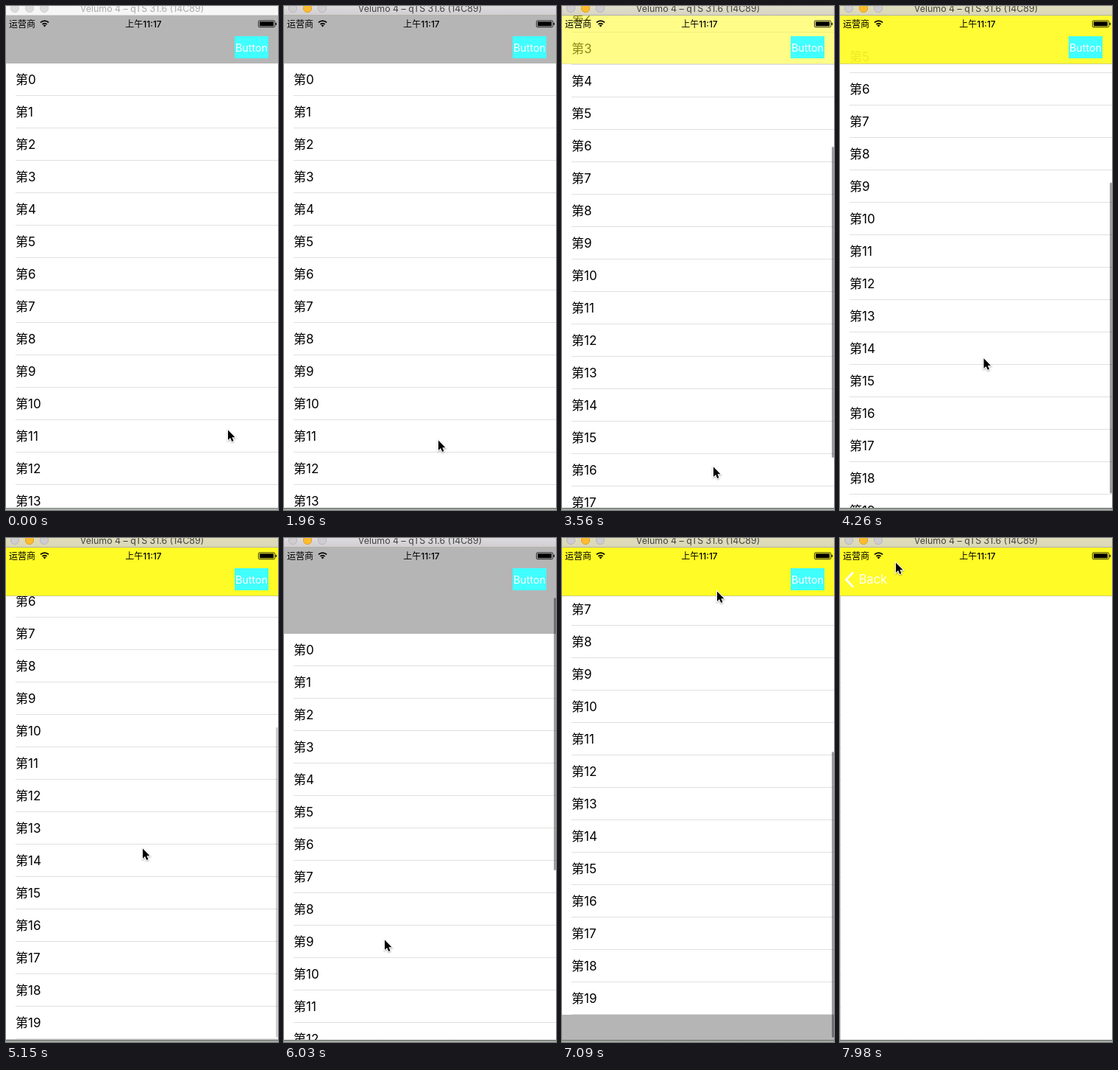
An HTML page with a canvas for the animation above (8 s loop, 370 by 684 pixels).

```html
<!DOCTYPE html>
<html lang="zh-CN">
<head>
<meta charset="utf-8">
<style>
  html, body { margin: 0; height: 100%; overflow: hidden; background: #fff; }
  canvas { display: block; }
</style>
</head>
<body>
<canvas id="stage" width="370" height="684"></canvas>
<script>
const ctx = document.getElementById('stage').getContext('2d');
const LOOP = 8000, STEP = 177.2;
const W = 370, TOP = 13, NAV = 78, BOTTOM = 681;
const ROW = 44, ROWS = 20, MAX_SCROLL = 277;
const FONT = 'Inter, "Noto Sans CJK SC", "Noto Sans CJK", sans-serif';

// Each track holds [step, value, ...] points
const SCROLL = [[11, 0], [12, 8], [15, 140], [17, 172], [20, 174], [25, 270], [27, 277],
  [30, 278], [32, 318], [33, 280], [34, -52], [36, 0], [37, 20], [39, 240], [40, 311], [42, 277]];
const CURSOR = [[1, 301, 574], [3, 207, 557], [5, 207, 557], [8, 209, 580], [11, 209, 588],
  [15, 208, 440], [17, 206, 440], [20, 205, 624], [25, 192, 440], [29, 185, 420],
  [32, 190, 55], [33, 172, 150], [34, 136, 544], [37, 160, 500], [40, 210, 71],
  [42, 328, 58], [43, 320, 56], [45, 75, 32]];
const PUSH = [[42, 0], [43, .4], [44, .9], [45, .997]];

function valueAt(track, step) {
  const next = track.findIndex(point => point[0] >= step);
  if (next <= 0) return track.at(next).slice(1);
  const a = track[next - 1], b = track[next];
  const part = (step - a[0]) / (b[0] - a[0]);
  return a.map((value, i) => value + (b[i] - value) * part).slice(1);
}

function barOpacity(step) {
  if (step < 12) return 0;
  if (step > 41) return Math.max(0, (44 - step) / 2);
  return step === 28 ? .75 : step === 29 ? .5 : 1;
}

function rect(color, x, y, w, h) {
  ctx.fillStyle = color;
  ctx.fillRect(x, y, w, h);
}

function text(string, x, y, size, color = '#000', align = 'left', weight = 400) {
  ctx.font = `${weight} ${size}px ${FONT}`;
  ctx.fillStyle = color;
  ctx.textAlign = align;
  ctx.fillText(string, x, y);
}

function gradient(y0, y1, from, to) {
  const fill = ctx.createLinearGradient(0, y0, 0, y1);
  fill.addColorStop(0, from);
  fill.addColorStop(1, to);
  return fill;
}

function drawList(scroll, opacity) {
  const top = NAV - scroll;
  rect('#b5b5b5', 0, TOP, W, BOTTOM - TOP);
  rect('#fff', 0, top, W, ROWS * ROW);
  for (let i = 0; i < ROWS; i++) {
    const y = Math.round(top + i * ROW);
    text('第' + i, 13, y + 28, 17);
    rect('#e0e0e1', 13, y + 43, W - 13, 1);
  }
  const inside = Math.max(0, Math.min(MAX_SCROLL, scroll));
  const over = scroll - inside;
  const barTop = 81 + inside / MAX_SCROLL * 175 + Math.max(0, over);
  ctx.fillStyle = `rgba(0,0,0,${.38 * opacity})`;
  ctx.beginPath();
  ctx.roundRect(367, barTop, 3, 422 - Math.abs(over), 1.5);
  ctx.fill();
}

function drawPage(push) {
  const x = Math.round(W * (1 - push));
  rect(`rgba(0,0,0,${.1 * push})`, 0, NAV, W, BOTTOM - NAV);
  ctx.save();
  ctx.shadowColor = 'rgba(0,0,0,.25)';
  ctx.shadowBlur = 4;
  rect('#fff', x, NAV, W, BOTTOM - NAV);
  ctx.restore();
}

function drawNav(tint, push) {
  ctx.globalAlpha = tint;
  rect('#fffb26', 0, TOP, W, NAV - TOP);
  rect('#d0ce78', 0, NAV, W, 1);

  ctx.globalAlpha = 1 - push;
  if (push < .95) {
    rect('#40ffff', 311, 41, 46, 30);
    text('Button', 334, 62, 14.3, '#fff', 'center');
  }
  ctx.globalAlpha = push;
  if (push) {
    ctx.strokeStyle = '#fff';
    ctx.lineWidth = 3;
    ctx.stroke(new Path2D('M18 46.5L8.5 56.5L18 66.5'));
    text('Back', 25 + 130 * (1 - push), 62, 16.6, '#fff');
  }
  ctx.globalAlpha = 1;
}

function drawStatus() {
  text('运营商', 4, 28.5, 12);
  text('上午11:17', 187, 28.5, 12, '#000', 'center', 500);
  ctx.strokeStyle = '#000';
  ctx.lineWidth = 1.8;
  for (const radius of [4.4, 7.8]) {
    ctx.beginPath();
    ctx.arc(52.5, 28, radius, -Math.PI * .75, -Math.PI * .25);
    ctx.stroke();
  }
  ctx.fillStyle = '#000';
  ctx.fill(new Path2D('M52.5 28.5L50.5 26.2Q52.5 24.8 54.5 26.2Z'));
  ctx.lineWidth = .8;
  ctx.beginPath();
  ctx.roundRect(343.4, 19.9, 22.4, 8.8, 1.5);
  ctx.stroke();
  rect('#000', 345, 21.3, 19, 6);
  rect('#000', 366.6, 22.8, 1.4, 3);
}

function drawWindow(active, tint) {
  rect(active ? gradient(0, TOP, '#dddbde', '#cfcdd0') : '#f6f6f6', 0, 0, W, TOP);
  if (active) rect(`rgba(226,224,165,${.6 * tint})`, 0, 0, W, TOP);
  rect(active ? '#b2b0a8' : '#d3d3d3', 0, TOP - 1, W, 1);
  [12, 32, 52].forEach((x, i) => {
    const lit = active && i === 1;
    ctx.beginPath();
    ctx.arc(x, 3, 5.6, 0, 7);
    ctx.fillStyle = lit ? '#ffbd2e' : active ? '#cfcdd0' : '#dcdcdc';
    ctx.strokeStyle = lit ? '#dfa023' : active ? '#b8b6ba' : '#d0d0d0';
    ctx.lineWidth = 1;
    ctx.fill();
    ctx.stroke();
  });
  text('Velumo 4 – qTS 31.6 (14C89)', 185, 8, 12.4, active ? '#444' : '#aaa', 'center');
  rect(gradient(BOTTOM, 684, active ? '#666' : '#858585', '#b9c5b9'), 0, BOTTOM, W, 3);
}

function drawCursor(x, y) {
  ctx.save();
  ctx.translate(x + .5, y + .5);
  ctx.shadowColor = 'rgba(0,0,0,.35)';
  ctx.shadowBlur = 2;
  ctx.shadowOffsetY = 1;
  const arrow = new Path2D('M0.5 1V14.5L3.6 11.6L5.8 16.5L8 15.5L5.9 10.8H10Z');
  ctx.strokeStyle = '#fff';
  ctx.lineWidth = 2;
  ctx.stroke(arrow);
  ctx.shadowColor = 'transparent';
  ctx.fillStyle = '#000';
  ctx.fill(arrow);
  ctx.restore();
}

function draw() {
  const step = Math.floor(performance.now() % LOOP / STEP);
  const [scroll] = valueAt(SCROLL, step);
  const [push] = valueAt(PUSH, step);
  const tint = Math.max(0, Math.min(1, (scroll - 64) / 200));

  ctx.save();
  ctx.beginPath();
  ctx.rect(0, TOP, W, BOTTOM - TOP);
  ctx.clip();
  ctx.save();
  ctx.translate(-Math.round(W * .3 * push), 0);
  drawList(scroll, barOpacity(step));
  ctx.restore();
  if (push) drawPage(push);
  drawNav(tint, push);
  drawStatus();
  ctx.restore();

  drawWindow(step >= 6, tint);
  drawCursor(...valueAt(CURSOR, step));
  requestAnimationFrame(draw);
}
draw();
</script>
</body>
</html>
```
